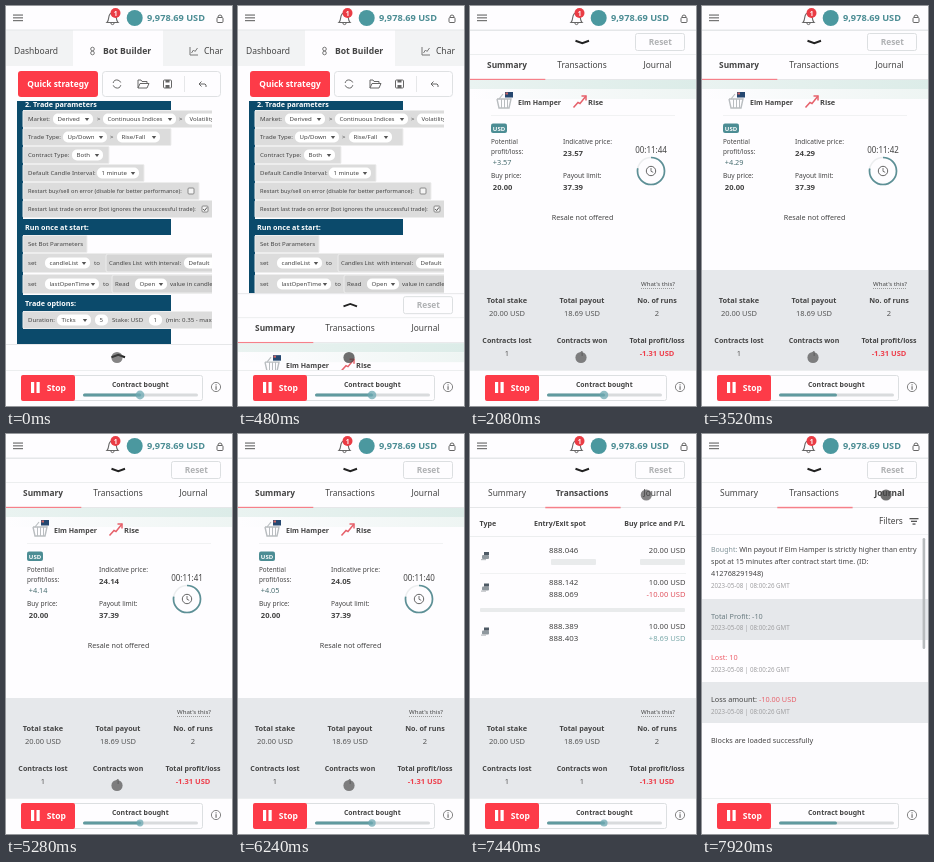
An HTML page with a canvas for the animation above (8 s loop, 226 by 400 pixels).

```html
<!DOCTYPE html>
<html lang="en">
<head>
<meta charset="utf-8">
<title>Trading bot</title>
<style>
html, body { margin: 0; width: 100%; height: 100%; overflow: hidden; background: #fefdff; }
canvas { display: block; width: 226px; height: 400px; }
</style>
</head>
<body>
<canvas id="stage"></canvas>
<script>
const W = 226, H = 400, LOOP = 8000;
const canvas = document.getElementById('stage');
const c = canvas.getContext('2d');
const dpr = window.devicePixelRatio || 1;
canvas.width = W * dpr;
canvas.height = H * dpr;

const INK = '#444', RED = '#fd3b48', TEAL = '#4c8d94', NAVY = '#0b4a6b';
const PAPER = '#fefdff', GREY = '#e6e8eb', LINE = '#e6e7e9', MUTED = '#a0a0a2';
const ASSET = 'Elm Hamper';

const clamp = x => Math.max(0, Math.min(1, x));
const ease = x => x * x * (3 - 2 * x);
const span = (t, a, b) => ease(clamp((t - a) / (b - a)));
const mix = (a, b, k) => a + (b - a) * k;
const at = (steps, t) => steps.filter(s => t >= s[0]).pop()[1];

function text(s, x, y, size, color = INK, bold = false, align = 'left') {
  c.font = `${bold ? 600 : 400} ${size}px "Noto Sans", "Open Sans", sans-serif`;
  c.textAlign = align;
  c.fillStyle = color;
  c.fillText(s, x, y);
}
const bold = (s, x, y, size, color = INK, align = 'left') => text(s, x, y, size, color, true, align);
const mid = (s, x, y, size, color = INK, heavy = false) => text(s, x, y, size, color, heavy, 'center');

function rect(x, y, w, h, color) {
  c.fillStyle = color;
  c.fillRect(x, y, w, h);
}
function round(x, y, w, h, r, fill, stroke) {
  c.beginPath();
  c.roundRect(x, y, w, h, r);
  if (fill) { c.fillStyle = fill; c.fill(); }
  if (stroke) { c.strokeStyle = stroke; c.lineWidth = 1; c.stroke(); }
}
function disc(x, y, r, color) {
  c.beginPath();
  c.arc(x, y, r, 0, 7);
  c.fillStyle = color;
  c.fill();
}
function arc(x, y, r, from, to, color, width = 1) {
  c.beginPath();
  c.arc(x, y, r, from, to);
  c.strokeStyle = color;
  c.lineWidth = width;
  c.stroke();
}
function path(points, color = INK, width = 1) {
  c.beginPath();
  for (let i = 0; i < points.length; i += 2) c.lineTo(points[i], points[i + 1]);
  c.strokeStyle = color;
  c.lineWidth = width;
  c.stroke();
}

function header() {
  rect(0, 0, W, 24, PAPER);
  rect(0, 23.5, W, 1, LINE);
  for (let i = 0; i < 3; i++) rect(7, 8.5 + 2.8 * i, 10, 1.1, '#666');
  c.beginPath();
  c.moveTo(101, 16.5);
  c.bezierCurveTo(104, 14, 101, 7, 106.5, 7);
  c.bezierCurveTo(112, 7, 109, 14, 112, 16.5);
  c.closePath();
  c.strokeStyle = '#666';
  c.lineWidth = 1.1;
  c.stroke();
  arc(106.5, 17, 1.6, 0, Math.PI, '#666');
  disc(109.5, 7, 5, '#ea3c45');
  mid('1', 109.5, 9.5, 6.5, '#fff', true);
  disc(128.7, 12, 8, '#4b989f');
  bold('9,978.69 USD', 141, 15.2, 9.2, TEAL);
  round(211, 11.5, 6, 5, 1, null, '#666');
  arc(214, 11, 2, Math.PI, 0, '#666');
}

function footer(t) {
  rect(0, 364, W, 36, PAPER);
  rect(0, 364, W, 1, '#eceeef');
  round(15.5, 369.5, 181, 25, 2, PAPER, '#dcdfe1');
  round(15, 369, 54, 26, 2, RED);
  rect(25, 376, 3.2, 11, '#fff');
  rect(30.5, 376, 3.2, 11, '#fff');
  bold('Stop', 40.8, 385.2, 8.5, '#fff');
  mid('Contract bought', 134.3, 381.4, 6.9, INK, true);
  round(77, 387.5, 115, 3, 1.5, '#d9dbdd');
  round(77, 387.5, 58, 3, 1.5, '#609a9f');
  const phase = ((t + 880) % 2200) / 2200;
  disc(134, 389, 4.5 * Math.sqrt(Math.sin(Math.PI * phase)), 'rgba(108,168,178,0.75)');
  arc(210, 381, 4.6, 0, 7, '#777', 0.9);
  rect(209.5, 380.2, 1.1, 3.6, '#666');
  rect(209.5, 378.3, 1.1, 1.1, '#666');
}

function pill(label, x, y, w, caret = true) {
  round(x, y - 5.5, w, 11, 5, '#fff');
  text(label, x + 4.5, y + 2.2, 6.1);
  if (!caret) return;
  const a = x + w - 6;
  c.beginPath();
  c.moveTo(a - 2.2, y - 1);
  c.lineTo(a + 2.2, y - 1);
  c.lineTo(a, y + 2);
  c.fillStyle = '#555';
  c.fill();
}
function block(y, width, label, h = 17, size = 6.1) {
  round(17, y - h / 2, width, h, 1, '#dcdcdc', '#ededed');
  text(label, 22, y + 2.2, size);
}
function navyBar(y, h, label) {
  rect(11, y, 154, h, NAVY);
  if (label) bold(label, 19, y + 10.5, 7.2, '#fff');
}
function checkbox(x, y, on) {
  round(x, y - 3, 6, 6, 1, '#f4f4f4', '#888');
  if (on) path([x + 1.2, y, x + 2.6, y + 1.6, x + 5, y - 1.6], '#555');
}

function toolbar() {
  rect(0, 24, W, 36, '#f2f3f4');
  rect(67, 24, 90, 37, PAPER);
  text('Dashboard', 8, 48, 8.5);
  arc(86.5, 43, 1.8, 0, 7, '#777');
  arc(86.5, 47, 1.8, 0, 7, '#777');
  bold('Bot Builder', 97, 48, 8.6);
  path([184, 41, 184, 49, 192, 49], '#777');
  path([185.5, 47, 187.5, 44, 189, 45.5, 191.5, 42], '#777');
  text('Char', 198, 48, 8.5);
  round(12, 65, 80, 26, 3, RED);
  mid('Quick strategy', 52, 81.2, 8.4, '#fff', true);
  round(96.5, 65.5, 118, 25, 3, PAPER, '#dfe1e3');
  arc(111, 78, 4, 0.3, 2.8, '#666');
  arc(111, 78, 4, 3.4, 5.9, '#666');
  path([132, 82, 132, 74, 135, 74, 136, 75.5, 141, 75.5, 141, 77], '#666');
  path([132, 82, 134, 77.5, 143, 77.5, 141, 82, 132, 82], '#666');
  round(157.5, 74, 8, 8, 1, null, '#666');
  rect(159.5, 74, 4, 2.5, '#666');
  rect(159.5, 79, 4, 3, '#666');
  rect(178, 70, 1, 16, LINE);
  path([193, 78, 199, 78, 200, 79, 200, 81], '#666');
  path([195.5, 75.5, 193, 78, 195.5, 80.5], '#666');
}

function builder() {
  rect(0, 24, W, 340, PAPER);
  c.save();
  c.beginPath();
  c.rect(10, 95, 196, 244);
  c.clip();
  rect(11, 95, 6, 243, NAVY);
  navyBar(90, 14, '');
  bold('2. Trade parameters', 19, 101, 7.2, '#fff');

  block(113, 200, 'Market:');
  pill('Derived', 47, 113, 40);
  text('>', 91, 115, 6);
  pill('Continuous Indices', 97, 113, 73);
  text('>', 173, 115, 6);
  pill('Volatility', 179, 113, 50);
  block(131, 148, 'Trade Type:');
  pill('Up/Down', 57, 131, 44);
  text('>', 104, 133, 6);
  pill('Rise/Fall', 111, 131, 43);
  block(149, 86, 'Contract Type:');
  pill('Both', 66, 149, 31);
  block(167, 121, 'Default Candle Interval:');
  pill('1 minute', 91, 167, 42);
  block(185, 176, 'Restart buy/sell on error (disable for better performance):', 17, 5.7);
  checkbox(182, 185, false);
  block(203, 200, 'Restart last trade on error (bot ignores the unsuccessful trade):', 17, 5.7);
  checkbox(196, 203, true);

  navyBar(213, 16, 'Run once at start:');
  block(238, 64, 'Set Bot Parameters');
  block(257, 200, 'set', 19);
  pill('candleList', 39, 257, 45);
  text('to', 88, 259, 6.1);
  round(100, 248, 120, 18, 2, '#d5d5d5', '#ededed');
  text('Candles List  with interval:', 103, 259, 5.9);
  pill('Default', 178, 257, 42);
  block(278, 200, 'set', 19);
  pill('lastOpenTime', 39, 278, 54);
  text('to', 97, 280, 6.1);
  round(106, 269, 120, 18, 2, '#d5d5d5', '#ededed');
  text('Read', 109, 280, 6.1);
  pill('Open', 129, 278, 32);
  text('value in candle', 164, 280, 6.1);

  navyBar(289, 16, 'Trade options:');
  block(314, 200, 'Duration:');
  pill('Ticks', 51, 314, 34);
  pill('5', 89, 314, 13, false);
  text('Stake: USD', 106, 316, 6.1);
  pill('1', 143, 314, 13, false);
  text('(min: 0.35 - max', 160, 316, 6.1);
  navyBar(323, 15);
  c.restore();
  toolbar();
}

function tabs(active, underline) {
  ['Summary', 'Transactions', 'Journal'].forEach((name, i) =>
    mid(name, [37, 112, 187.5][i], 62, i === active ? 8.3 : 8.4, INK, i === active));
  rect(0, 73, W, 1, LINE);
  rect(underline * 75.3, 72.8, 75.3, 1.5, '#f6808a');
}

function fade(y, h, from, to) {
  const g = c.createLinearGradient(0, 0, W, 0);
  g.addColorStop(0, from);
  g.addColorStop(1, to);
  rect(0, y, W, h, g);
}

function summary(t) {
  const price = at([[0, 23.72], [1120, 23.57], [2400, 23.98], [3360, 24.29],
    [4000, 24.2], [5040, 24.14], [6000, 24.05]], t);
  const seconds = 45 - Math.max(0, Math.floor((t - 1440) / 960 - 0.02) + 1);
  fade(74, 9, '#eaf3f1', '#dcece8');
  fade(83, 10, PAPER, '#eef5f3');

  path([27, 93, 29, 102, 39, 102, 41, 93, 27, 93], '#b9bdc0', 1.4);
  for (let x = 31; x < 39; x += 3) rect(x, 93, 1, 9, '#b9bdc0');
  path([29, 93, 33, 88], '#b9bdc0', 1.2);
  rect(35, 86, 8, 5.5, '#25476f');
  rect(35.5, 86.5, 2.5, 2, '#c66');
  bold(ASSET, 48, 98.8, 7);
  path([103.5, 101.5, 108, 96.5, 110, 97.5, 116, 90], '#e6616b', 1.5);
  path([111.5, 90, 116, 90, 116, 94.5], '#e6616b', 1.5);
  bold('Rise', 118, 98.6, 7.4);
  rect(21, 109, 184, 0.8, '#eef0f1');

  round(21, 117.5, 16, 9.5, 2, TEAL);
  mid('USD', 29, 124.7, 6, '#fff', true);
  text('Potential', 21, 138, 6.4);
  text('profit/loss:', 21, 147.8, 6.4);
  text('+' + (price - 20).toFixed(2), 22.8, 158.6, 7.3, '#4a6f72');
  text('Indicative price:', 93, 137.8, 6.6);
  bold(price.toFixed(2), 93, 149.6, 7.8);
  text('Buy price:', 21, 172, 6.6);
  bold('20.00', 22.8, 183.8, 7.6);
  text('Payout limit:', 93, 172, 6.6);
  bold('37.39', 93, 183.8, 7.8);

  mid('00:11:' + seconds, 181, 147, 8);
  const top = -Math.PI / 2;
  arc(181, 165, 13.5, 0, 7, '#eceeef', 1.6);
  arc(181, 165, 13.5, top, top + Math.PI * 2 * (660 + seconds) / 900, '#5d9096', 1.7);
  arc(181, 165, 4.7, 0, 7, '#666', 1);
  path([181, 162, 181, 165.3, 183.2, 166.3], '#666', 0.9);
  mid('Resale not offered', 112.5, 213.5, 7.2);
}

function cubeIcon(y) {
  round(12, y + 1, 7, 4, 1, '#8f989e');
  rect(14, y - 2, 5, 3, '#4e5a65');
  rect(11, y + 5, 5, 1.2, '#b9bdc0');
}
function transactions() {
  bold('Type', 9.5, 92, 7.1);
  bold('Entry/Exit spot', 64, 92, 7);
  bold('Buy price and P/L', 215, 92, 7, INK, 'right');
  rect(0, 102, W, 1, '#eceeef');
  const row = (y, entry, exit, buy, result, color) => {
    cubeIcon(y + 1);
    text(entry, 79, y, 7.9);
    text(buy, 215.5, y, 7.6, INK, false, 'right');
    if (exit) {
      text(exit, 79, y + 12.7, 7.9);
      text(result, 215.5, y + 12.7, 7.6, color, false, 'right');
    } else {
      round(81, y + 6, 45, 6, 1, '#e9ebec');
      round(170, y + 6, 45, 6, 1, '#e9ebec');
    }
  };
  row(119, '888.046', '', '20.00 USD');
  row(150.5, '888.142', '888.069', '10.00 USD', '-10.00 USD', '#e0525d');
  row(194.5, '888.389', '888.403', '10.00 USD', '+8.69 USD', '#7aa9aa');
  rect(10, 139, 206, 0.8, '#eef0f1');
  round(10, 174, 205, 4, 1, '#e9ebec');
}

function totals() {
  rect(0, 264, W, 101, GREY);
  text("What's this?", 171, 279.7, 6.1);
  for (let x = 171; x < 205; x += 2) rect(x, 282, 1, 0.8, '#888');
  const cell = (x, y, label, value, size, color) => {
    mid(label, x, y, size, INK, true);
    mid(value, x, y + 13.3, 7.5, color || '#555', Boolean(color));
  };
  cell(37, 296.6, 'Total stake', '20.00 USD', 7.4);
  cell(112, 296.6, 'Total payout', '18.69 USD', 7.2);
  cell(187, 296.6, 'No. of runs', '2', 7.2);
  cell(37, 336.6, 'Contracts lost', '1', 7.1);
  cell(112, 336.6, 'Contracts won', '1', 7);
  cell(187, 336.6, 'Total profit/loss', '-1.31 USD', 7, '#ee3f4c');
}

function journal() {
  text('Filters', 177, 90.4, 8.4);
  [9, 6, 3].forEach((w, i) => rect(212 - w / 2, 84 + 2.7 * i, w, 1.3, '#555'));
  rect(0, 100, W, 0.8, '#eceeef');
  rect(0, 165, W, 41, GREY);
  rect(0, 248, W, 41, GREY);
  const stamp = y => text('2023-05-08 | 08:00:26 GMT', 9, y, 6.2, MUTED);
  text('Bought:', 9, 118, 7.05, '#82959a');
  const x = 9 + c.measureText('Bought: ').width;
  text(`Win payout if ${ASSET} is strictly higher than entry`, x, 118, 7.05);
  text('spot at 15 minutes after contract start time. (ID:', 9, 130, 7.05);
  text('412768291948)', 9, 142, 7.3);
  stamp(153.7);
  text('Total Profit: -10', 9, 185, 7.3, '#6b7d82');
  stamp(196.3);
  text('Lost: 10', 9, 226.3, 7.3, '#ee5f6a');
  stamp(238);
  text('Loss amount: ', 9, 268, 7.3);
  text('-10.00 USD', 9 + c.measureText('Loss amount: ').width, 268, 7.3, '#e8626c');
  stamp(279.7);
  text('Blocks are loaded successfully', 9, 309, 7.25);
  round(220.6, 104, 2.6, 111, 1.3, '#b8bbbd');
}

function drawer(t) {
  const open = span(t, 430, 630);
  c.save();
  c.beginPath();
  c.rect(0, 24, W, 340);
  c.clip();
  c.translate(0, 314 * (1 - open));
  rect(0, 24, W, 341, PAPER);
  rect(0, 24, W, 1, LINE);
  const dip = open > 0.5 ? 2.5 : -2.5;
  path([105.5, 36 - dip / 2, 112.3, 36 + dip / 2, 119, 36 - dip / 2], '#222', 1.9);
  if (open > 0) {
    rect(0, 48, W, 1, '#eceeef');
    round(165.5, 27.5, 49, 17, 2, PAPER, '#dcdfe1');
    mid('Reset', 190.3, 39, 8.4, '#b0b2b4', true);
    const active = t < 6720 ? 0 : t < 7840 ? 1 : 2;
    tabs(active, span(t, 6800, 6980) + span(t, 7920, 8100));
    [summary, transactions, journal][active](t);
    if (active < 2) totals();
  }
  c.restore();
}

function pointer(t) {
  const up = span(t, 6240, 6600), right = span(t, 7220, 7500);
  const x = mix(111, 116.5, up) + 67.5 * right;
  const y = mix(351.5, 61, up);
  const pressed = (t > 380 && t < 760) || (t > 6640 && t < 6840) || t > 7760;
  disc(x, y, 5.6, `rgba(70,70,70,${pressed ? 0.78 : 0.66})`);
}

function draw(t) {
  c.setTransform(dpr, 0, 0, dpr, 0, 0);
  rect(0, 0, W, H, PAPER);
  if (t < 640) builder();
  drawer(t);
  header();
  footer(t);
  pointer(t);
}

const start = performance.now();
function frame() {
  draw((performance.now() - start) % LOOP);
  requestAnimationFrame(frame);
}
frame();
</script>
</body>
</html>
```
